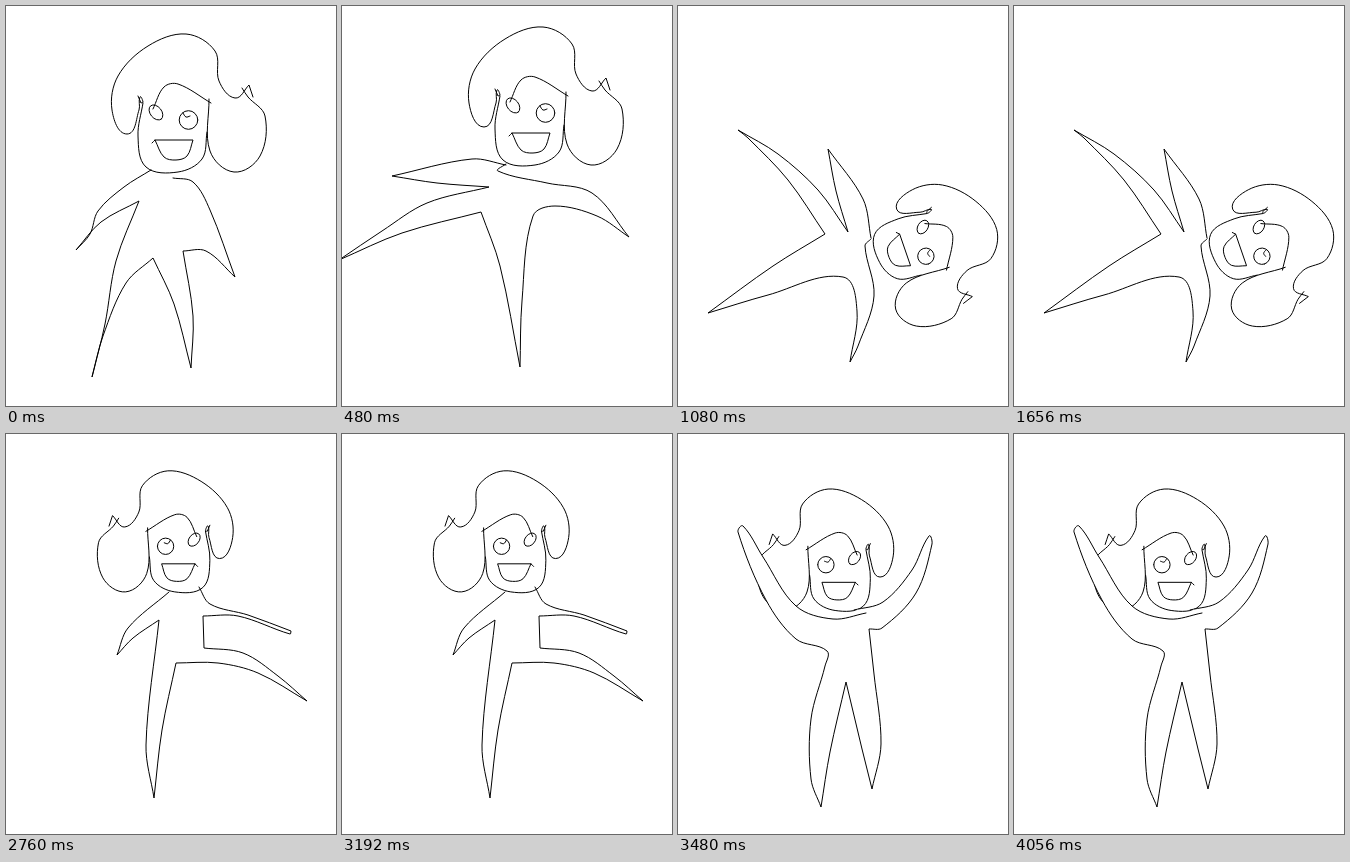
Recreate the animation shown at these times as an HTML page with a canvas. Size 330 by 400 pixels, loop 4.44 s.

```html
<!DOCTYPE html>
<html lang="en">
<head>
<meta charset="utf-8">
<title>Dancing doodle</title>
<style>
  html, body { margin: 0; width: 100%; height: 100%; overflow: hidden; background: #fff; }
  canvas { display: block; }
</style>
</head>
<body>
<canvas id="stage" width="330" height="400"></canvas>
<script>
const ctx = document.getElementById('stage').getContext('2d');

// Pen strokes as key points; "/" marks a sharp corner.
const hair = '132,90 135,97 / 137,96 134,91 133,104 121,128 106,104 112,70 142,40 180,28 209,45 213,75 229,92 243,79 / 247,91';
const curl = '236,82 242,91 259,110 254,150 228,166 204,145 203,93';
const forehead = '147,103 158,81 172,78 205,97';
const jaw = '137,97 132,130 140,161 172,166 196,153 201,126';
const pupil = '177,107 180,111 184,110';
const mouth = '146,137 149,134 / 187,134 / 181,150 170,154 158,151 149,134';

const stand = '145,164 118,181 92,205 84,228 70,244 / 95,216 133,195 / 110,255 99,318 86,371 / 97,330 120,277 147,252 / 168,298 185,362 / 187,310 177,245 / 200,245 229,271 / 204,204 187,176 167,172';
const leap = '164,159 130,153 50,170 / 95,177 147,181 / 85,197 40,225 -3,254 / 60,227 139,206 / 158,260 178,361 / 180,295 191,210 213,200 255,210 287,231 / 250,187 205,177 156,165 164,158';
const dive = '193,232 185,193 150,143 / 158,185 170,226 / 140,184 100,148 60,124 / 70,132 110,174 147,228 / 95,260 30,307 / 90,289 165,271 179,305 172,356 / 180,340 196,290 187,240 193,233';
const kick = '129,152 118,169 80,180 37,196 / 38,199 90,181 125,181 / 124,213 / 85,218 50,241 21,266 / 70,238 110,228 152,228 / 166,295 174,363 / 182,310 169,185 / 195,203 211,220 / 200,193 159,157';
const cheer = '188,179 155,185 118,172 85,123 65,92 60,98 88,166 118,205 149,217 147,232 133,285 133,345 143,373 / 152,318 168,248 / 184,315 194,355 / 203,310 196,240 191,195 / 204,194 238,159 254,110 251,102 234,136 205,168 176,176';

// The head pivots on (190, 100); flip -1 mirrors it.
const poses = [
  { ms: 480, body: stand, x: 190, y: 100 },
  { ms: 600, body: leap, x: 211, y: 93 },
  { ms: 960, body: dive, x: 261.7, y: 252.5, size: 0.88, turn: 71 },
  { ms: 720, body: kick, x: 168.5, y: 99, size: 0.877 },
  { ms: 720, body: kick, x: 153, y: 100, size: 0.877, flip: -1, mirror: [-1, 0, 0, 1, 322, 1] },
  { ms: 960, body: cheer, x: 141.3, y: 118.4, size: 0.88, flip: -1, solid: true }
];
const loop = poses.reduce((sum, pose) => sum + pose.ms, 0);

// A point a given distance from p, along the direction from a to b.
function handle(p, a, b, distance) {
  const k = distance / Math.hypot(b[0] - a[0], b[1] - a[1]);
  return [p[0] + (b[0] - a[0]) * k, p[1] + (b[1] - a[1]) * k];
}

// Each run becomes a smooth curve whose tangents follow the neighbouring points.
function toPath(stroke) {
  const path = new Path2D();
  let last = null;
  for (const run of stroke.split(' / ')) {
    const pts = run.split(' ').map(p => p.split(',').map(Number));
    if (last) pts.unshift(last);
    else path.moveTo(...pts[0]);
    for (let i = 0; i < pts.length - 1; i++) {
      const a = pts[i], b = pts[i + 1];
      const reach = Math.hypot(b[0] - a[0], b[1] - a[1]) / 3;
      path.bezierCurveTo(
        ...handle(a, pts[i - 1] || a, b, reach),
        ...handle(b, a, pts[i + 2] || b, -reach),
        ...b);
    }
    last = pts[pts.length - 1];
  }
  return path;
}

function oval(x, y, rx, ry, tilt) {
  const path = new Path2D();
  path.ellipse(x, y, rx, ry, tilt, 0, Math.PI * 2);
  return path;
}

function place(path, matrix) {
  const placed = new Path2D();
  placed.addPath(path, matrix);
  return placed;
}

const head = new Path2D();
for (const stroke of [hair, curl, forehead, jaw, pupil, mouth]) head.addPath(toPath(stroke));
head.addPath(oval(150, 106.5, 8.5, 5.7, 0.9));
head.addPath(oval(182.5, 114, 9.3, 9.3, 0));

for (const pose of poses) {
  const { x, y, size = 1, turn = 0, flip = 1 } = pose;
  const matrix = new DOMMatrix().translate(x, y).rotate(turn)
    .scale(size * flip, size).translate(-190, -100);
  pose.headPath = place(head, matrix);
  pose.bodyPath = place(toPath(pose.body), new DOMMatrix(pose.mirror));
}

function poseAt(time) {
  let left = time % loop;
  return poses.find(pose => (left -= pose.ms) < 0);
}

function draw(pose) {
  ctx.fillStyle = '#fff';
  ctx.fillRect(0, 0, 330, 400);
  ctx.strokeStyle = '#000';
  ctx.lineWidth = 1;
  ctx.lineCap = ctx.lineJoin = 'round';
  ctx.stroke(pose.headPath);
  if (pose.solid) ctx.fill(pose.bodyPath);
  ctx.stroke(pose.bodyPath);
}

const start = performance.now();
function tick() {
  draw(poseAt(Math.max(0, performance.now() - start)));
  requestAnimationFrame(tick);
}
tick();
</script>
</body>
</html>
```
